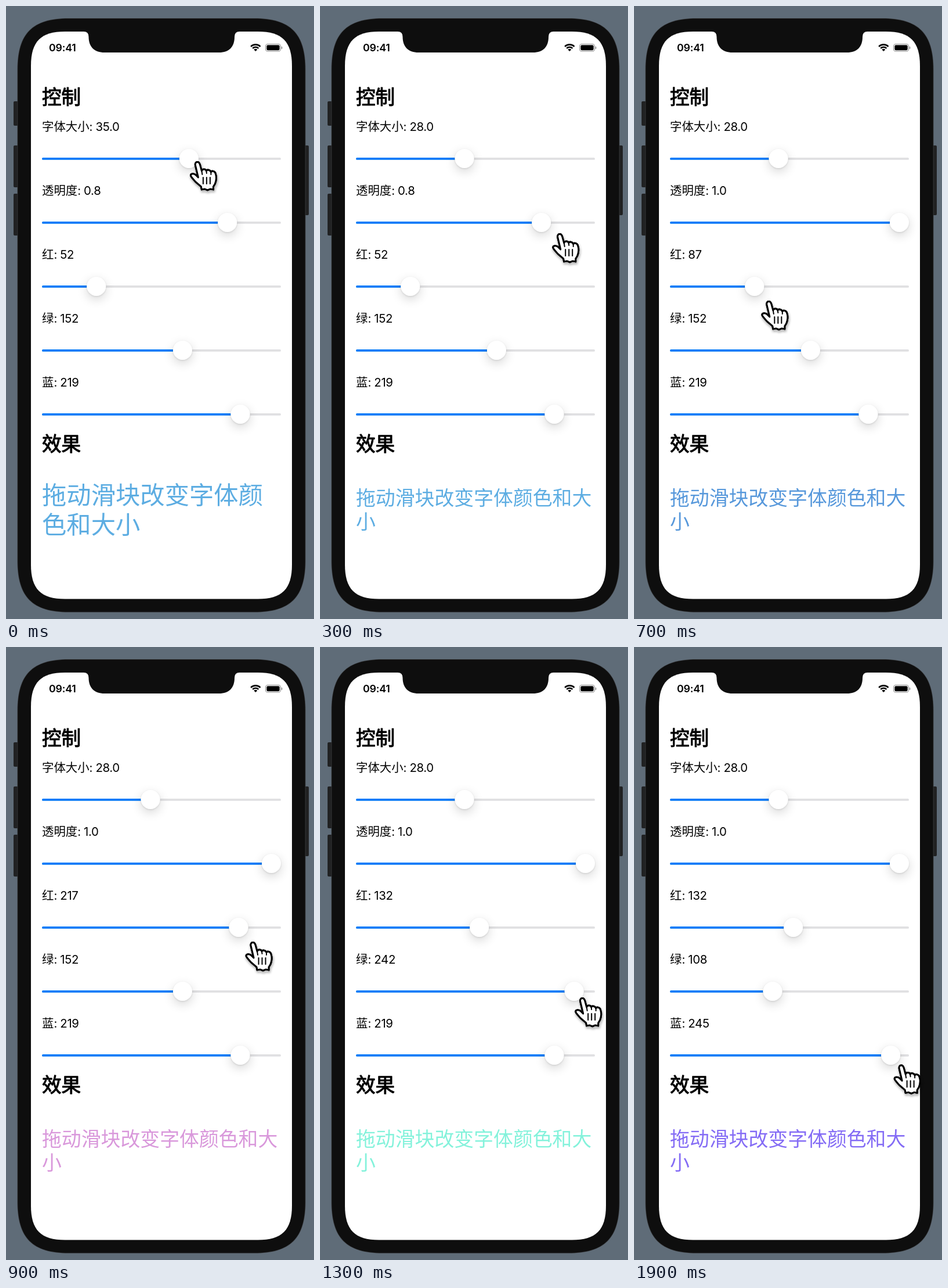
These frames come from a looping animation (531 by 1055 pixels, 2 s). An HTML page with a canvas:

```html
<!DOCTYPE html>
<html lang="zh-CN">
<head>
<meta charset="utf-8">
<title>字体滑块</title>
<style>
html, body { margin: 0; width: 100%; height: 100%; overflow: hidden; background: #5f6c78; }
canvas { display: block; width: 531px; height: 1055px; }
</style>
</head>
<body>
<canvas id="stage" width="531" height="1055"></canvas>
<script>
const ctx = document.getElementById('stage').getContext('2d');
const FONT = 'Inter, "Noto Sans CJK SC", "Noto Sans CJK", sans-serif';
const LOOP = 2000, STEP = 100, SCALE = 1.2;
const LEFT = 62, RIGHT = 474, KNOB = 16.5;
const FIRST_ROW = 262.9, ROW_GAP = 110;
const MESSAGE = '拖动滑块改变字体颜色和大小';

// drag: value by step while the hand holds the knob; grip: hand offset from the knob
const SLIDERS = [
  { name: '字体大小', min: 10, max: 50, digits: 1, grip: [2, 4], drag: { 0: 35, 2: 28 } },
  { name: '透明度', min: 0, max: 1, digits: 1, grip: [19, 18], drag: { 3: 0.8, 5: 1 } },
  { name: '红', min: 0, max: 255, digits: 0, grip: [12, 24], drag: { 6: 52, 7: 87, 9: 217, 11: 132 } },
  { name: '绿', min: 0, max: 255, digits: 0, grip: [1.5, 10], drag: { 12: 152, 13: 242, 14: 108 } },
  { name: '蓝', min: 0, max: 255, digits: 0, grip: [5.5, 15.5], drag: { 15: 219, 16: 39, 18: 245 } }
];

const HAND = new Path2D(`M9 7 C8 1 15 -1 17 6 L20 17 C21 13 27 13 28 17
  C29 14 35 15 36 19 C37 16 43 17 44 22 C46 28 45 34 43 39 L40 44 L40 49
  L35 48 L30 50 L25 48 L20 49 L19 44 C15 40 10 37 7 33 C5 30 2 28 1 25
  C1 21 7 21 10 24 L14 28 Z`);
const HAND_LINES = new Path2D(
  'M20 17 L21 23 M28 17 L28.5 21 M36 19 L36 23 M22.5 28 V39 M28.5 28 V39 M34.5 28 V39');

const startOf = slider => Math.min(...Object.keys(slider.drag));

function valueAt({ drag }, step) {
  const steps = Object.keys(drag).map(Number).sort((a, b) => a - b);
  const next = steps.findIndex(s => s > step);
  if (next === 0) return drag[steps[0]];
  if (next < 0) return drag[steps.at(-1)];
  const a = steps[next - 1], b = steps[next];
  return drag[a] + (drag[b] - drag[a]) * (step - a) / (b - a);
}

function knobX({ min, max }, value) {
  const from = LEFT + KNOB, to = RIGHT - KNOB;
  return from + (to - from) * (value - min) / (max - min);
}

// Text colour over white; warm tones appear as plain grey.
function inkColor(opacity, r, g, b) {
  const rgb = b < Math.min(r, g) ? Array(3).fill(0.3 * r + 0.5 * g + 0.2 * b) : [r, g, b];
  return `rgb(${rgb.map(v => Math.round(255 + (v - 255) * opacity))})`;
}

function box(x, y, w, h, r, fill) {
  ctx.beginPath();
  ctx.roundRect(x, y, w, h, r);
  ctx.fillStyle = fill;
  ctx.fill();
}

// Rectangle whose corners ease into the straight sides
function smoothBox(x, y, w, h, r, fill) {
  const e = r * 1.25, c = r * 0.365;
  ctx.beginPath();
  for (let i = 0; i < 4; i++) {
    const dx = i === 1 || i === 2 ? -1 : 1, dy = i > 1 ? -1 : 1;
    const cx = dx > 0 ? x : x + w, cy = dy > 0 ? y : y + h;
    const side = k => [cx, cy + dy * k], flat = k => [cx + dx * k, cy];
    const [a, b] = i % 2 ? [flat, side] : [side, flat];
    ctx.lineTo(...a(e));
    ctx.bezierCurveTo(...a(c), ...b(c), ...b(e));
  }
  ctx.fillStyle = fill;
  ctx.fill();
}

function text(str, x, y, size, { weight = 400, color = '#000', spacing = 0, bolder = 0 } = {}) {
  ctx.font = `${weight} ${size}px ${FONT}`;
  ctx.letterSpacing = spacing + 'px';
  ctx.fillStyle = ctx.strokeStyle = color;
  ctx.fillText(str, x, y);
  if (bolder) {
    ctx.lineWidth = bolder;
    ctx.lineJoin = 'round';
    ctx.strokeText(str, x, y);
  }
  return x + ctx.measureText(str).width;
}

function shadow(color, blur, dx, dy) {
  ctx.shadowColor = color;
  ctx.shadowBlur = blur;
  ctx.shadowOffsetX = dx;
  ctx.shadowOffsetY = dy;
}

function drawPhone() {
  ctx.fillStyle = '#5f6c78';
  ctx.fillRect(0, 0, 531, 1055);
  const button = (x, y, h) => box(x, y, 10, h, 2, '#202122');
  button(13, 164, 42);
  button(13, 240, 72);
  button(13, 323, 72);
  button(512, 240, 120);
  smoothBox(19.5, 21, 497, 1022.5, 71, '#3a3c3f');
  smoothBox(20.3, 21.8, 495.4, 1020.9, 70, '#0e0e0e');
  smoothBox(43, 44, 450, 976.5, 47, '#fff');

  ctx.beginPath();
  ctx.moveTo(134, 43);
  ctx.lineTo(134, 44);
  ctx.quadraticCurveTo(142.5, 44, 142.5, 53);
  ctx.bezierCurveTo(142.5, 70, 152, 80, 170, 80);
  ctx.lineTo(367, 80);
  ctx.bezierCurveTo(385, 80, 394, 70, 394, 53);
  ctx.quadraticCurveTo(394, 44, 402.5, 44);
  ctx.lineTo(402.5, 43);
  ctx.fillStyle = '#0e0e0e';
  ctx.fill();
}

function drawStatus() {
  text('09:41', 74, 78.3, 17.8, { weight: 600, spacing: -0.2 });

  const fan = r => ctx.arc(430.3, 78, r, -Math.PI * 0.75, -Math.PI * 0.25);
  ctx.strokeStyle = ctx.fillStyle = '#000';
  ctx.lineWidth = 2.6;
  for (const r of [7.2, 11.6]) {
    ctx.beginPath();
    fan(r);
    ctx.stroke();
  }
  ctx.beginPath();
  ctx.moveTo(430.3, 78);
  fan(4.2);
  ctx.fill();

  ctx.beginPath();
  ctx.roundRect(447.5, 65.5, 26, 12.5, 3.8);
  ctx.strokeStyle = '#8c8c8c';
  ctx.lineWidth = 1.1;
  ctx.stroke();
  box(449.3, 67.3, 22.4, 9, 2.2, '#000');
  box(474.8, 69.8, 1.5, 4.2, [0, 1, 1, 0], '#8c8c8c');
}

function drawSlider(slider, y, value) {
  const x = knobX(slider, value);
  const end = text(slider.name, LEFT, y - 47.7, 20.4);
  text(`: ${value.toFixed(slider.digits)}`, end, y - 47.7, 20.4, { spacing: -0.35 });
  box(LEFT, y - 1.9, RIGHT - LEFT, 3.8, 1.9, '#e0e0e2');
  box(LEFT, y - 1.9, x - LEFT, 3.8, 1.9, '#067bf9');

  ctx.save();
  for (const [alpha, blur, drop] of [[0.16, 18, 6], [0.12, 3, 1]]) {
    shadow(`rgba(0,0,0,${alpha})`, blur, 0, drop);
    box(x - KNOB, y - KNOB - 0.5, KNOB * 2, KNOB * 2, KNOB, '#fff');
  }
  ctx.restore();
}

function drawMessage(points, color) {
  const size = points * SCALE * 1.008;
  const perLine = Math.floor((RIGHT - LEFT) / size);
  const lines = [MESSAGE.slice(0, perLine), MESSAGE.slice(perLine)];
  lines.forEach((line, i) =>
    text(line, LEFT, 867.3 + (i - 0.5) * size * 1.185 + size * 0.36, size, { color }));
}

function drawHand(x, y) {
  ctx.save();
  ctx.translate(x, y);
  ctx.lineJoin = ctx.lineCap = 'round';
  ctx.strokeStyle = '#000';
  ctx.fillStyle = '#fff';
  ctx.lineWidth = 3;
  shadow('rgba(0,0,0,0.45)', 4, 1, 3);
  ctx.stroke(HAND);
  ctx.shadowColor = 'transparent';
  ctx.fill(HAND);
  ctx.stroke(HAND);
  ctx.lineWidth = 2;
  ctx.stroke(HAND_LINES);
  ctx.restore();
}

function draw(now) {
  const step = Math.floor((now % LOOP) / STEP);
  const values = SLIDERS.map(s => valueAt(s, step));
  const [size, ...tint] = values;
  const rowY = row => FIRST_ROW + row * ROW_GAP;

  drawPhone();
  drawStatus();
  text('控制', LEFT, 168.7, 33.6, { bolder: 1.1 });
  text('效果', LEFT, 766, 33.6, { bolder: 1.1 });
  SLIDERS.forEach((s, row) => drawSlider(s, rowY(row), values[row]));
  drawMessage(size, inkColor(...tint));

  const held = SLIDERS.findLastIndex(s => startOf(s) <= step);
  const [dx, dy] = SLIDERS[held].grip;
  drawHand(Math.min(knobX(SLIDERS[held], values[held]) + dx, 455), rowY(held) + dy);
}

let start;
function tick(now) {
  start ??= now;
  draw(now - start);
  requestAnimationFrame(tick);
}
draw(0);
requestAnimationFrame(tick);
</script>
</body>
</html>
```
